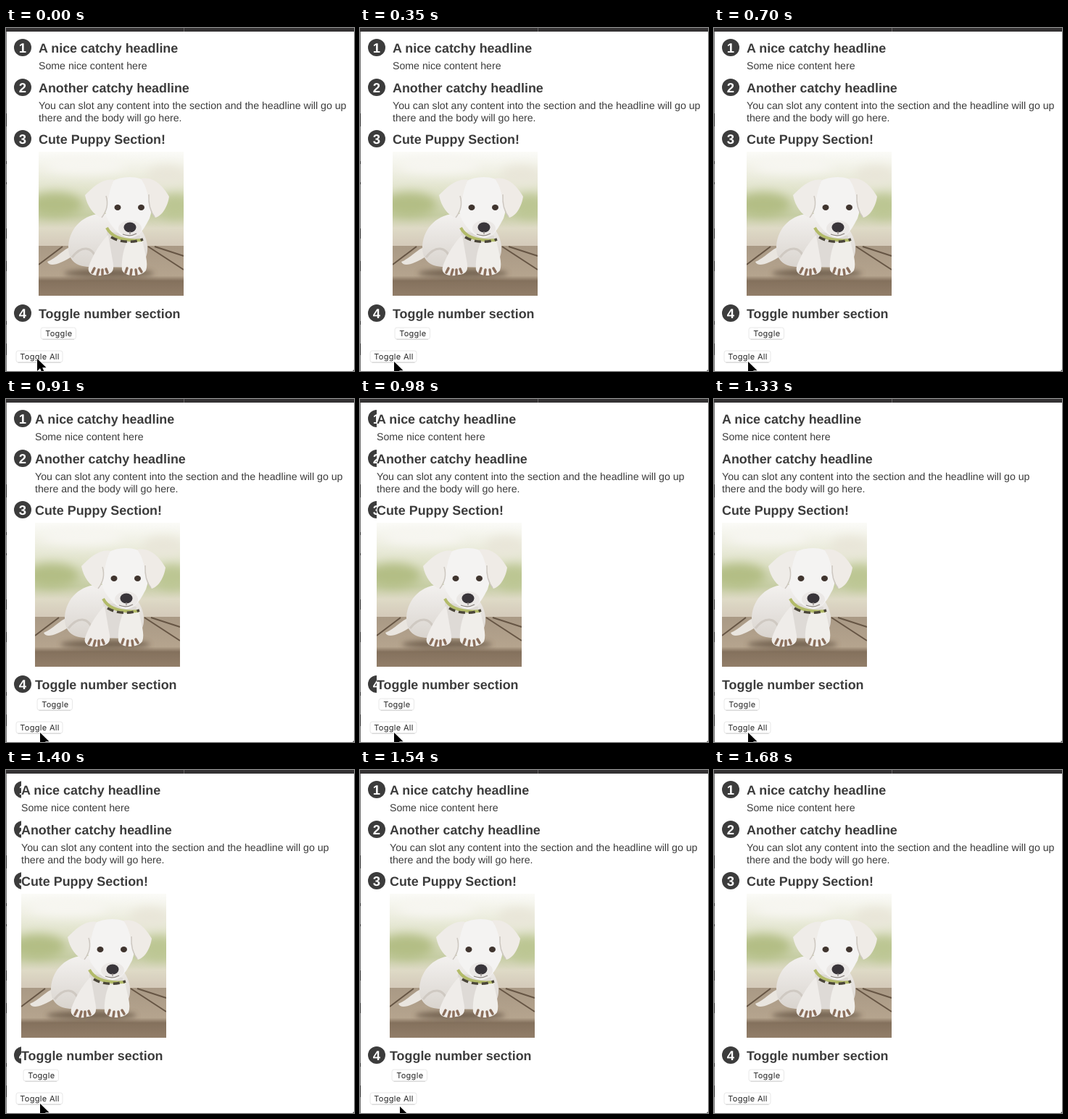
These frames come from a looping animation (480 by 474 pixels, 2.1 s). An HTML page:

```html
<!DOCTYPE html>
<html lang="en">
<head>
<meta charset="utf-8">
<title>Numbered sections</title>
<style>
  html, body { margin: 0; width: 100%; height: 100%; overflow: hidden; background: #fff; }
  svg { display: block; width: 480px; height: 474px; }
  text { font-family: "Liberation Sans", Arial, sans-serif; fill: #3c3c3c; text-rendering: geometricPrecision; }
  .head { font-size: 17.9px; font-weight: 700; }
  .body { font-size: 14.16px; }
  .num { font-size: 18.5px; font-weight: 700; fill: #fff; text-anchor: middle; }
  .btn text { font: 11px Inter, "Open Sans", sans-serif; letter-spacing: .3px; fill: #262626; text-anchor: middle; }
  .btn rect { fill: #fff; stroke: #e2e2e2; stroke-width: .8; }
  .btn path { stroke: #c8c8c8; stroke-width: .8; }
</style>
</head>
<body>
<svg viewBox="0 0 480 474">
  <defs>
    <clipPath id="slot"><rect id="slotRect" x="0" y="6" width="45" height="468"/></clipPath>
    <clipPath id="frame"><rect x="45" y="171" width="200" height="199"/></clipPath>
    <filter id="soft" x="-30%" y="-30%" width="160%" height="160%"><feGaussianBlur stdDeviation="7"/></filter>
    <filter id="edge"><feGaussianBlur stdDeviation=".6"/></filter>
    <filter id="shade" x="-40%" y="-40%" width="180%" height="180%"><feGaussianBlur stdDeviation="3.5"/></filter>
    <linearGradient id="scene" x1="0" y1="0" x2="0" y2="1">
      <stop offset="0" stop-color="#fbfbf8"/>
      <stop offset=".14" stop-color="#efefe3"/>
      <stop offset=".3" stop-color="#dcdfc4"/>
      <stop offset=".44" stop-color="#c6cda4"/>
      <stop offset=".53" stop-color="#dedac6"/>
      <stop offset=".64" stop-color="#d5cbbb"/>
    </linearGradient>
    <linearGradient id="wood" x1="0" y1="0" x2="0" y2="1">
      <stop offset="0" stop-color="#a99985"/>
      <stop offset=".6" stop-color="#b5a48e"/>
      <stop offset=".7" stop-color="#84715d"/>
      <stop offset="1" stop-color="#927e69"/>
    </linearGradient>
    <linearGradient id="fur" x1="0" y1="0" x2="0" y2="1">
      <stop offset="0" stop-color="#f3f1ef"/>
      <stop offset="1" stop-color="#d9d4ce"/>
    </linearGradient>
  </defs>

  <rect width="480" height="474" fill="#fff"/>
  <g id="badges" clip-path="url(#slot)"></g>

  <g id="content">
    <g id="copy"></g>
    <g clip-path="url(#frame)">
      <rect x="45" y="171" width="200" height="199" fill="url(#scene)"/>
      <g filter="url(#soft)">
        <ellipse cx="68" cy="244" rx="38" ry="17" fill="#b3be85"/>
        <ellipse cx="234" cy="246" rx="26" ry="17" fill="#bcc693"/>
        <ellipse cx="110" cy="190" rx="55" ry="12" fill="#f7f6f1"/>
        <ellipse cx="222" cy="204" rx="28" ry="14" fill="#e9e6d9"/>
      </g>
      <rect x="45" y="301" width="200" height="69" fill="url(#wood)"/>
      <path d="M45 327L78 302M196 302L245 334M205 302L245 315" stroke="#665544" stroke-width="2" filter="url(#edge)"/>
      <path d="M45 346H245" stroke="#5b4b3c" stroke-width="2.5" filter="url(#edge)"/>
      <ellipse cx="142" cy="339" rx="62" ry="6" fill="#5c4b3a" opacity=".7" filter="url(#shade)"/>
      <g filter="url(#edge)">
        <path d="M91 302C79 305 70 318 57 323C60 330 72 328 94 314Z" fill="#e9e5df"/>
        <path d="M139 257C111 254 88 273 86 301C85 321 97 331 119 330L179 331C197 323 200 301 188 281Z" fill="url(#fur)"/>
        <path d="M91 317C104 300 119 301 125 320" fill="none" stroke="#cfc9c2" stroke-width="3"/>
        <path d="M139 281C141 299 138 315 146 330H165C169 317 186 313 185 287Z" fill="#dedad6"/>
        <path d="M141 286C131 295 119 315 114 330C111 342 126 344 136 341C150 340 149 331 147 321Z" fill="#efece9"/>
        <path d="M166 297C161 309 159 324 160 334C163 345 187 344 193 335C197 325 191 309 188 293Z" fill="#f0eeea"/>
        <path d="M139 276Q149 296 188 293" fill="none" stroke="#b3bb6a" stroke-width="4"/>
        <path d="M145 289Q164 300 189 292" fill="none" stroke="#4a4539" stroke-width="3.5" stroke-dasharray="9 5"/>
        <path d="M145 212C162 203 186 204 196 215C202 229 204 246 198 263C191 276 185 289 171 290C157 289 149 278 141 266C133 250 134 225 145 212Z" fill="#f4f3f2"/>
        <path d="M149 210C133 207 120 220 109 231C112 247 121 258 131 262C142 251 139 229 149 210Z" fill="#efece8"/>
        <path d="M186 208C203 205 216 217 225 233C223 247 215 260 206 262C196 249 199 226 186 208Z" fill="#efebe6"/>
        <path d="M138 232Q143 248 132 262M197 230Q196 250 205 261" fill="none" stroke="#cdc7c0" stroke-width="1.500"/>
        <ellipse cx="171" cy="277" rx="16" ry="11" fill="#ebe8e6"/>
        <ellipse cx="154" cy="248" rx="4.500" ry="4" fill="#40352f"/>
        <ellipse cx="186.500" cy="248" rx="4.500" ry="4" fill="#40352f"/>
        <ellipse cx="171" cy="275.500" rx="8.500" ry="7" fill="#39353a"/>
        <path d="M171 281V285M161 285Q171 289 180 284" fill="none" stroke="#8b8480" stroke-width="1.200"/>
        <path d="M119 338l3-6M126 341l2-7M133 341v-7M140 338l-2-5M165 338l2-6M172 341l1-7M180 341l-1-7M187 337l-3-5" stroke="#8a6e5b" stroke-width="3.500" stroke-linecap="round"/>
      </g>
    </g>
  </g>

  <g id="fixed"></g>
  <g id="cursor">
    <path d="M0 0V17L4 13.200L7 20L10 18.700L7.200 12.200H12.500Z" fill="#000" stroke="#fff" stroke-width="1.400" stroke-linejoin="round" paint-order="stroke"/>
  </g>
  <rect width="480" height="5" fill="#343233"/>
  <rect x="245" width="1" height="5" fill="#656364"/>
  <rect y="5" width="1" height="469" fill="#777"/>
  <path d="M0 118V136M0 184V188M0 213V216M0 277V291M0 322V336M0 405V410M0 436V452" stroke="#333" stroke-width="2"/>
  <path d="M480 472V474H478Z" fill="#555"/>
</svg>
<script>
const LOOP = 2100, STEP = 70, GAP = 34;
const $ = id => document.getElementById(id);

const label = (cls, x, y, s) => `<text class="${cls}" x="${x}" y="${y}">${s}</text>`;
const button = (x, y, w, s) => `<g class="btn">
  <rect x="${x}" y="${y}" width="${w}" height="16" rx="3"/>
  <path d="M${x + 2.5} ${y + 16.2}h${w - 5}"/>
  <text x="${x + w / 2 + 0.5}" y="${y + 12}">${s}</text></g>`;

const sections = [
  [34, "A nice catchy headline"],
  [89, "Another catchy headline"],
  [160, "Cute Puppy Section!"],
  [401, "Toggle number section"]
];
const paragraphs = [
  [57, "Some nice content here"],
  [112, "You can slot any content into the section and the headline will go up"],
  [128.5, "there and the body will go here."]
];

$("badges").innerHTML = sections.map(([y], i) =>
  `<circle cx="23" cy="${y - 7}" r="12" fill="#3c3c3c"/>` + label("num", 23, y - 0.5, i + 1)).join("");
$("copy").innerHTML =
  sections.map(([y, s]) => label("head", 45, y, s)).join("") +
  paragraphs.map(([y, s]) => label("body", 45, y, s)).join("") +
  button(48, 414, 48.5, "Toggle");
$("fixed").innerHTML = button(14, 446, 64, "Toggle All");

const clamp = v => Math.min(1, Math.max(0, v));
const mix = (a, b, p) => a + (b - a) * p;

// CSS "ease": cubic-bezier(.25, .1, .25, 1)
function ease(x) {
  if (x <= 0 || x >= 1) return clamp(x);
  const bez = (a, b, u) => 3 * a * u * (1 - u) ** 2 + 3 * b * u * u * (1 - u) + u ** 3;
  let lo = 0, hi = 1;
  for (let i = 0; i < 24; i++) {
    const mid = (lo + hi) / 2;
    if (bez(0.25, 0.25, mid) < x) lo = mid; else hi = mid;
  }
  return bez(0.1, 1, lo);
}

// time, x, y of the pointer tip
const path = [[0, 43, 457], [350, 47, 461], [1400, 47, 461], [1540, 55, 465], [1610, 61, 474], [1680, 66, 490]];

function pointer(t) {
  const i = path.findIndex(k => k[0] > t);
  if (i < 0) return path[path.length - 1].slice(1);
  const [t0, x0, y0] = path[i - 1], [t1, x1, y1] = path[i];
  const p = (t - t0) / (t1 - t0);
  return [mix(x0, x1, p), mix(y0, y1, p)];
}

function draw(ms) {
  const t = Math.floor((ms % LOOP) / STEP) * STEP;
  const closed = ease((t - 874) / 280) - ease((t - 1330) / 350);
  const gap = Math.round(GAP * (1 - closed));
  $("content").setAttribute("transform", `translate(${gap - GAP} 0)`);
  $("slotRect").setAttribute("width", 11 + gap);
  $("cursor").setAttribute("transform", `translate(${pointer(t).join(" ")})`);
}

const start = performance.now();
function tick() {
  draw(performance.now() - start);
  requestAnimationFrame(tick);
}
draw(0);
requestAnimationFrame(tick);
</script>
</body>
</html>
```
